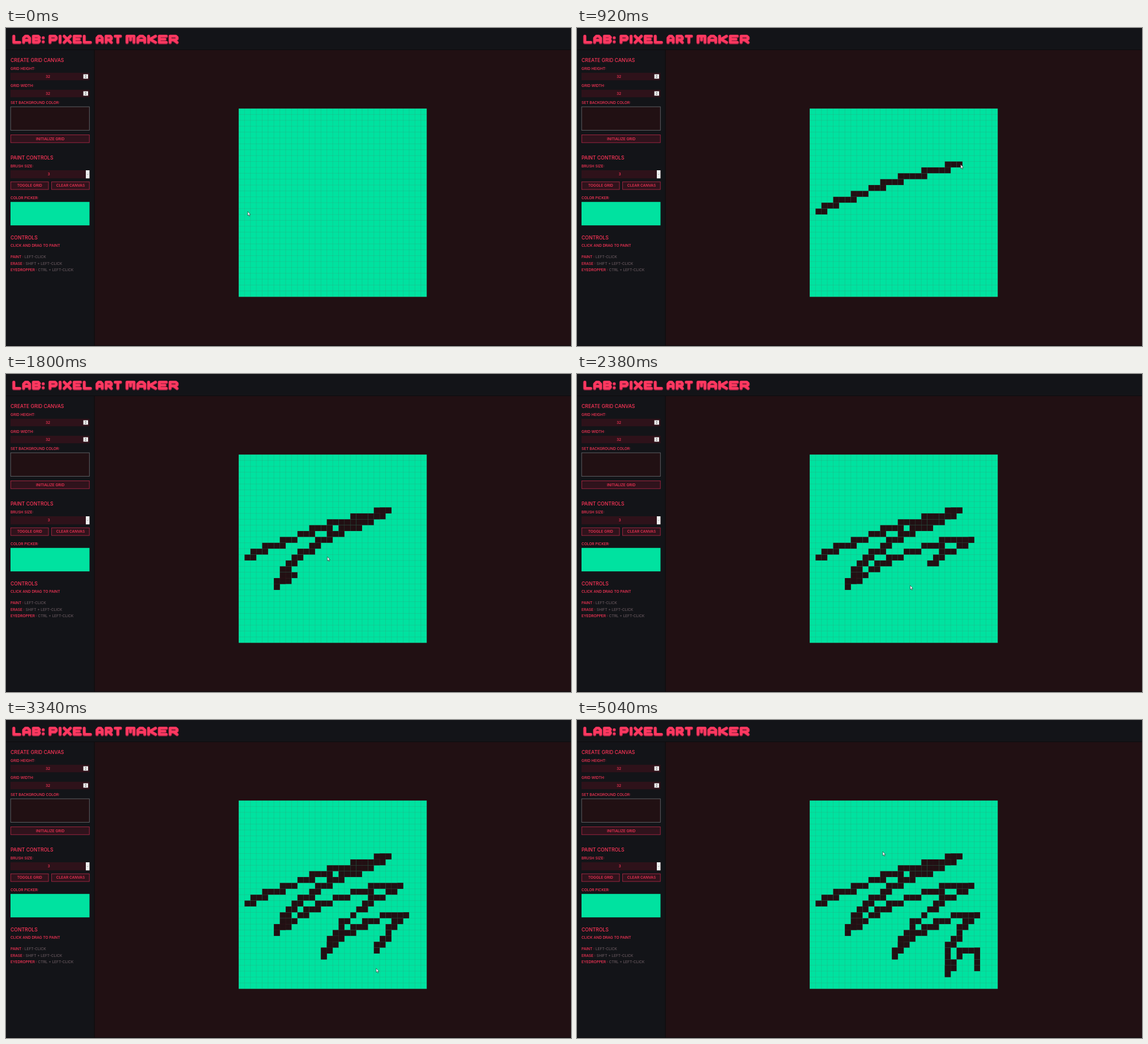
An HTML page for the animation above (5.08 s loop, 998 by 561 pixels).

```html
<!DOCTYPE html>
<html lang="en">
<head>
<meta charset="utf-8">
<title>Lab: Pixel Art Maker</title>
<style>
  html, body { margin: 0; width: 100%; height: 100%; overflow: hidden; background: #211013; }
  svg { display: block; width: 100vw; height: 100vh; }
  text { font: 500 6.55px Inter, "Open Sans", sans-serif; fill: #ff3558; }
  .head { font-size: 8.65px; }
  .mid { text-anchor: middle; }
  .dim { fill: #66575d; }
  .field { fill: #2e121a; }
  .button { fill: #2f131c; stroke: #a92744; stroke-width: .9; }
  #logo path { fill: none; stroke-linecap: round; stroke-linejoin: round; vector-effect: non-scaling-stroke; }
</style>
</head>
<body>
<svg viewBox="0 0 998 561" preserveAspectRatio="none">
  <rect width="998" height="561" fill="#211013"/>
  <rect width="998" height="38" fill="#131418"/>
  <rect y="38" width="156" height="523" fill="#131418"/>
  <path d="M0 38.5H998M156.2 39V561M0 560.6H998" stroke="#0c0b0e" fill="none"/>
  <g id="logo" role="img" aria-label="LAB: PIXEL ART MAKER"></g>

  <text class="head" x="8" y="60">CREATE GRID CANVAS</text>
  <text x="8" y="74.2">GRID HEIGHT:</text>
  <rect class="field" x="8" y="79" width="139.5" height="13.2"/>
  <text class="mid" x="74" y="87.9">32</text>
  <text x="8" y="104.2">GRID WIDTH:</text>
  <rect class="field" x="8" y="109" width="139.5" height="13.2"/>
  <text class="mid" x="74" y="117.9">32</text>
  <g id="spinners"></g>
  <text x="8" y="134.2">SET BACKGROUND COLOR:</text>
  <rect x="8.2" y="139" width="139.1" height="41.4" fill="#211013" stroke="#66686c" stroke-width=".9"/>
  <rect class="button" x="8.4" y="188.5" width="138.8" height="13.7"/>
  <text class="mid" x="78" y="197.6">INITIALIZE GRID</text>

  <text class="head" x="8" y="232.2">PAINT CONTROLS</text>
  <text x="8" y="246.3">BRUSH SIZE:</text>
  <rect class="field" x="8" y="251" width="139.5" height="14.3"/>
  <text class="mid" x="75.5" y="260.4">3</text>
  <rect x="141" y="251" width="6.5" height="14.3" fill="#efefef"/>
  <path d="M142.9 257.5l1.3 1.3 1.3-1.3" fill="none" stroke="#777" stroke-width=".6"/>
  <rect class="button" x="8.4" y="271.3" width="66.6" height="13.6"/>
  <text class="mid" x="41.7" y="280.3">TOGGLE GRID</text>
  <rect class="button" x="80.6" y="271.3" width="66.6" height="13.6"/>
  <text class="mid" x="114" y="280.3">CLEAR CANVAS</text>
  <text x="8" y="302.3">COLOR PICKER:</text>
  <rect x="8" y="306.8" width="139.5" height="41.4" fill="#00e2a0"/>

  <text class="head" x="8" y="372.6">CONTROLS</text>
  <text x="8" y="386.4">CLICK AND DRAG TO PAINT</text>
  <text x="8" y="406.4">PAINT : <tspan class="dim">LEFT-CLICK</tspan></text>
  <text x="8" y="417.5">ERASE : <tspan class="dim">SHIFT + LEFT-CLICK</tspan></text>
  <text x="8" y="428.5">EYEDROPPER : <tspan class="dim">CTRL + LEFT-CLICK</tspan></text>

  <rect x="411" y="142.1" width="332.2" height="332.2" fill="#00e2a0"/>
  <g id="cells" fill="#211013"></g>
  <path id="lines" fill="none" stroke="#961e32" stroke-opacity=".13" stroke-width=".8"/>
  <path id="cursor" d="M0 0V7.2L1.6 5.8 2.7 8.4 3.8 7.9 2.7 5.4H4.8Z" fill="#fff" stroke="#222" stroke-width=".6"/>
</svg>
<script>
const $ = id => document.getElementById(id);
const add = (parent, tag, attrs) => {
  const el = document.createElementNS("http://www.w3.org/2000/svg", tag);
  for (const k in attrs) el.setAttribute(k, attrs[k]);
  return parent.appendChild(el);
};

const LOOP = 5080, TICK = 20, LAG = 90;
const X0 = 411, Y0 = 142.1, SIZE = 10.38, COUNT = 32;

// Title lettering on a 10 x 10 box
const BOWL = "M0 10V0H8L10 2V4L8 6H0";
const GLYPHS = {
  L: "M0 0V10H10",
  A: "M0 10V3L3 0H7L10 3V10M0 6.5H10",
  B: "M0 0H8L10 2 8 5H0M8 5L10 7V8L8 10H0V0",
  P: BOWL,
  I: "M0 0V10",
  X: "M0 0L10 10M10 0L0 10",
  E: "M10 0H0V10H10M0 5H8",
  R: BOWL + "M5 6L10 10",
  T: "M0 0H10M5 0V10",
  M: "M0 10V0H10V10M5 0V6",
  K: "M0 0V10M10 0L2 5 10 10",
  ":": "M0 2.5v.1M0 9v.1"
};
const NARROW = 6, GAP = 1.2;
const isSlim = c => "I:".includes(c);
const letters = [];
for (const [word, from, to] of [["LAB:", 11, 69], ["PIXEL", 75, 152], ["ART", 158, 205], ["MAKER", 211, 305]]) {
  const slim = [...word].filter(isSlim).length;
  const wide = (to - from - slim * NARROW - GAP * (word.length - 1)) / (word.length - slim);
  let x = from;
  for (const c of word) {
    const w = isSlim(c) ? NARROW : wide;
    letters.push({ d: GLYPHS[c], x: x + 2.8, sx: Math.max(w - 5.6, .4) / 10 });
    x += w + GAP;
  }
}
for (const [color, width, dy] of [["#7d1d38", 6.2, .5], ["#ff3860", 4.6, 0]])
  for (const { d, x, sx } of letters)
    add($("logo"), "path", {
      d, stroke: color, "stroke-width": width,
      transform: `translate(${x} ${14.3 + dy}) scale(${sx} 1.1)`
    });

for (const y of [81.6, 111.6]) {
  add($("spinners"), "rect", { x: 136.6, y, width: 8.4, height: 7.8, fill: "#efefef" });
  add($("spinners"), "path", { d: `M139.3 ${y + 3}l1.5-1.7 1.5 1.7zm0 1.8l1.5 1.7 1.5-1.7z`, fill: "#444" });
}

let grid = "";
for (let i = 0; i <= COUNT; i++) {
  const p = i * SIZE, end = COUNT * SIZE;
  grid += `M${X0 + p} ${Y0}v${end}M${X0} ${Y0 + p}h${end}`;
}
$("lines").setAttribute("d", grid);

const legs = [], cells = [];

// One pointer move along a polyline, slowing down for power > 1
function addLeg(from, to, power, points) {
  const dist = [0];
  for (let i = 1; i < points.length; i++)
    dist.push(dist[i - 1] + Math.hypot(points[i][0] - points[i - 1][0], points[i][1] - points[i - 1][1]));
  legs.push({ from, to, power, points, dist });
}

function pointer(t) {
  const { from, to, power, points, dist } = legs.filter(l => l.from <= t).pop() || legs[0];
  const u = Math.min(Math.max((t - from) / (to - from), 0), 1);
  const s = (1 - (1 - u) ** power) * dist[dist.length - 1];
  let i = 1;
  while (i < dist.length - 1 && dist[i] < s) i++;
  const f = (s - dist[i - 1]) / (dist[i] - dist[i - 1]);
  const [a, b] = [points[i - 1], points[i]];
  return [a[0] + (b[0] - a[0]) * f, a[1] + (b[1] - a[1]) * f];
}

// A cell is painted shortly after the pointer passes closest to it
function paintTime(x, y, from, to, end) {
  let best = Infinity, when = from;
  for (let t = from; t <= to; t += 10) {
    const [px, py] = pointer(t);
    const d = Math.hypot(px - x, py - y);
    if (d < best) { best = d; when = t; }
  }
  return Math.min(when + LAG, end);
}

// cols: start column, the column where each row border is crossed, end column
function stroke(from, to, end, power, row, step, cols) {
  const last = cols.length - 1;
  addLeg(from, to, power, cols.map((c, i) => {
    const border = row + .5 + (i - .5) * step;
    const y = i === 0 ? row + .5 : i === last ? row + (last - 1) * step + .5 : border;
    return [X0 + c * SIZE, Y0 + y * SIZE];
  }));
  for (let i = 0; i < last; i++) {
    const lo = Math.min(cols[i], cols[i + 1]), hi = Math.max(cols[i], cols[i + 1]);
    const stop = Math.max(Math.ceil(hi), Math.floor(lo) + 1);
    for (let c = Math.floor(lo); c < stop; c++) {
      const x = X0 + c * SIZE, y = Y0 + (row + i * step) * SIZE;
      cells.push({
        at: paintTime(x + SIZE / 2, y + SIZE / 2, from, to, end),
        el: add($("cells"), "rect", { x, y, width: SIZE, height: SIZE })
      });
    }
  }
}

stroke(320, 880, 920, 1.2, 17, -1, [1.54, 2.5, 4.5, 7.5, 10, 12.5, 15.5, 19.5, 23.5, 25.7]);
stroke(1080, 1520, 1540, 1, 9, 1, [25.7, 24.8, 23, 20.5, 17.5, 15.5, 13.5, 12.5, 10.5, 9.5, 8.5, 7.9, 7.5, 6.5, 6.4]);
stroke(1640, 2100, 2160, 1.35, 22, -1, [6.4, 6.9, 8.5, 10, 11.5, 13.5, 16, 19, 22.5, 27.7]);
stroke(2160, 2560, 2700, 1.62, 14, 1, [27.7, 27, 25, 22.5, 21.5, 20, 19, 17.7, 17.3, 16.5, 15.7, 15.3, 14.7, 14.4]);
stroke(2680, 3070, 3200, 1, 26, -1, [14.4, 14.9, 15.5, 16.5, 17.5, 19.5, 21.5, 24, 28.7]);
stroke(3080, 3420, 3440, 1.7, 19, 1, [28.7, 28, 26.5, 25.7, 25.4, 24.5, 23.7, 23.5, 23.4, 23.4, 23.4, 23.6]);
stroke(3620, 4060, 4140, 1, 29, -1, [23.6, 23.8, 24.3, 25, 25.6, 28.5]);
stroke(4060, 4220, 4300, 1, 25, 1, [28.5, 28.6, 28.5, 28.5, 28.4]);
addLeg(4700, 5040, 1.4, [[705.8, 438], [540, 232]]);

function draw(now) {
  const t = Math.floor((now % LOOP) / TICK) * TICK;
  for (const { at, el } of cells) el.setAttribute("visibility", t >= at ? "visible" : "hidden");
  $("cursor").setAttribute("transform", `translate(${pointer(t).join(" ")})`);
}

const start = performance.now();
function frame() {
  draw(performance.now() - start);
  requestAnimationFrame(frame);
}
frame();
</script>
</body>
</html>
```
